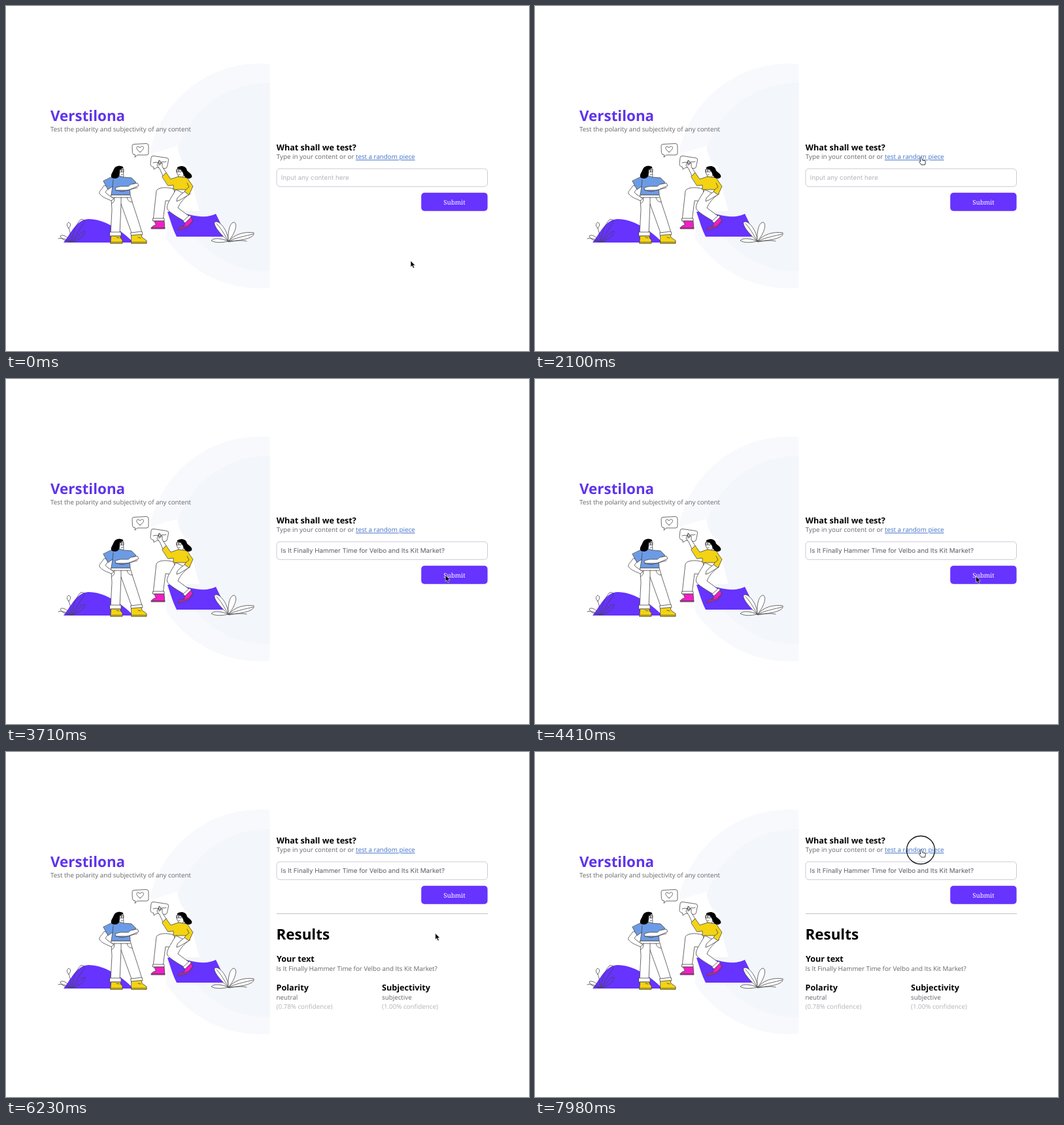
An HTML page for the animation above (8000 ms loop, 800 by 528 pixels).

```html
<!DOCTYPE html>
<html lang="en">
<head>
<meta charset="utf-8">
<title>Verstilona</title>
<style>
html, body { margin: 0; width: 100%; height: 100%; overflow: hidden; background: #fff; }
svg { display: block; width: 100%; height: 100%; font: 9.8px "Open Sans", sans-serif; fill: #66666d; text-rendering: geometricPrecision; }
.h1 { font-size: 22.4px; font-weight: 700; fill: #000; }
.h2 { font-size: 12.6px; font-weight: 700; fill: #000; }
.brand { fill: #6034ea; }
.link { fill: #4272c8; text-decoration: underline; }
.soft { fill: #b3b3b8; }
.input { font-family: Inter, sans-serif; }
.button { font-family: "Noto Serif", serif; font-weight: 500; fill: #fff; text-anchor: middle; }
.ink { fill: none; stroke: #444; stroke-width: .8; stroke-linejoin: round; stroke-linecap: round; }
.ink .w { fill: #fff; }
.ink .k { fill: #000; stroke: none; }
.ink .b { fill: #6c9be6; }
.ink .y { fill: #f3d312; }
.ink .p { fill: #f01fc4; }
</style>
</head>
<body>
<svg viewBox="0 0 800 528">
  <defs><clipPath id="half"><path d="M200 80H403.500V440H200z"/></clipPath></defs>

  <!-- backdrop -->
  <g clip-path="url(#half)">
    <circle cx="388" cy="260" r="172" fill="#f7f9fc"/>
    <circle cx="400" cy="262" r="144" fill="#f3f6fa"/>
    <path fill="#fff" d="M200 205L215 206 222 226 262 214Q266 240 280 246L288 285 296 314H248L244 364H200z"/>
  </g>

  <text class="h1 brand" x="68" y="176">Verstilona</text>
  <text x="68" y="192.300">Test the polarity and subjectivity of any content</text>

  <!-- hills -->
  <g fill="#6633ff">
    <path d="M88 362C99 349 107 327 126 326C149 326 176 342 195 362z"/>
    <path d="M247 315C262 311 277 321 296 322C308 323 314 321 321 318L338 353H261C255 341 252 330 247 315z"/>
  </g>

  <g class="ink">
    <!-- speech bubbles -->
    <path class="w" d="M193 214Q193 211.500 196 211.500L215 210.500Q218 211 218 214V225Q218 228 215 228H201L197 231.500 198 228Q194 228 193.500 225z"/>
    <path d="M205 223.500C195 217 202 212 205 217C209 211 215 218 205 223.500z"/>
    <path class="w" d="M222 232Q222 229 226 229.500L246 232.500Q249 233 248.500 236L246.500 246Q246 249 242 248.500L231 247 226 250V246.500Q221 246 221 242z"/>
    <path d="M225 240l5-1 2 1 3-4 2 4 3-2 1 1 4-1"/>

    <!-- plants -->
    <path d="M100 361C99 350 98 345 96 340M96 340C92 337 93 332 96 331C100 333 99 337 96 340M101 361C102 349 106 335 114 327C121 325 121 331 117 335C112 343 107 350 102 361M99 361C94 352 86 349 83 352C85 358 93 360 99 361M80 356C86 354 94 358 99 361M103 361C110 352 117 344 121 345C120 352 111 358 103 361"/>
    <path class="w" d="M340 360C331 352 317 337 319 331C325 326 340 343 340 360z"/>
    <path class="w" d="M340 360C339 343 343 331 349 331C356 334 348 352 340 360z"/>
    <path class="w" d="M340 360C332 362 320 363 314 359C318 354 331 356 340 360z"/>
    <path class="w" d="M341 360C349 349 365 345 379 347C381 355 361 359 341 360z"/>
    <path d="M340 360C334 349 328 339 322 333M341 360C353 354 367 352 378 349M341 361C352 359 362 358 368 360"/>

    <!-- standing figure -->
    <path class="w" d="M161 289H190L194 303C199 318 204 333 208 347L193 350 176 303 174 350H160L162 312z"/>
    <path class="w" d="M159 346H176V352H159zM191 347L208 345 209 350 192 352z"/>
    <path d="M161 293H190M176 293V303M166 293C166 300 164 301 162 302M185 293C187 299 189 300 193 300"/>
    <path class="y" d="M161 352H175V355L178 358V363.500H160z"/>
    <path class="y" d="M192 351L207 349.500 208 354 215 359V363.500H192z"/>
    <path d="M160 361.500H178M192 361.500H215M169 354l4 1M202 354l4 1"/>
    <path class="w" d="M150 275C145 282 142 284 143 287C147 293 155 295 161 298L165 295 155 288 152 285 158 277z"/>
    <path class="w" d="M173 253V262L179 263 180 260 179 247 174 245z"/>
    <path class="b" d="M163 261L173 260 180 262 192 263 199 270 189 275 190 289H161L163 276 156 281 149 268z"/>
    <path class="w" d="M191 273L201 271 203 275 187 282 168 282 167 278 175 276 187 276z"/>
    <path d="M168 282L178 284 201 278M164 266L163 277"/>
    <path class="k" d="M179 246C172 243 166 245 164 252C162 256 159 260 162 263C166 265 172 264 173 260C175 255 172 251 179 248z"/>
    <path d="M174 250H177V254H174zM177 250H180V254H177zM176 258h3"/>

    <!-- leaping figure -->
    <path class="w" d="M257 280C244 276 232 278 230 283L225 329H240L244 298 258 299z"/>
    <path class="w" d="M260 281L278 290C269 297 265 304 263 309L282 323 274 330C264 324 250 316 247 311C244 306 251 296 260 281z"/>
    <path class="w" d="M225 325H242V329H225zM271 329L281 320 284 324 275 333z"/>
    <path class="p" d="M227 329H242L243 341H222Q222 337 229 335z"/>
    <path class="p" d="M274 332L283 323 286 329 279 338 263 343Q262 338 272 337z"/>
    <path d="M222 339.500H243M264 341L279 336 286 328"/>
    <path class="w" d="M233 239L231 244 235 249 240 260 245 255 239 246 239 240 235 242z"/>
    <path class="w" d="M263 247L261 255 264 261 270 263 273 255z"/>
    <path class="w" d="M278 281L268 288 262 294 261 299 266 297 281 288z"/>
    <path class="y" d="M239 261L245 255 252 265 264 261 277 263 286 276 280 289 273 284 275 281 256 281 256 274 248 275z"/>
    <path d="M277 271L280 277 275 281"/>
    <path class="k" d="M262 247C268 243 276 245 277 252C280 255 286 258 284 262C281 266 274 264 272 259C270 254 269 250 262 249z"/>
    <path d="M261 250H264V254H261zM265 250H268V254H265zM264 258h2M234 244V236M236 243L237 238"/>
  </g>

  <!-- form -->
  <g id="form">
    <text class="h2" x="413.800" y="220.500">What shall we test?</text>
    <text x="413.800" y="234.300">Type in your content or or <tspan class="link">test a random piece</tspan></text>
    <rect x="414" y="249" width="322.500" height="27.300" rx="5" fill="#fff" stroke="#cbcad6"/>
    <text id="field" class="input" x="420.500" y="266"></text>
    <rect x="635.200" y="285.700" width="101.400" height="28" rx="5" fill="#6633ff"/>
    <text class="button" x="686" y="303.500">Submit</text>
  </g>

  <!-- results -->
  <g id="results">
    <path d="M414 247.500H737" stroke="#c3c3c6"/>
    <text class="h1" x="413.500" y="287">Results</text>
    <text class="h2" x="414" y="321.300">Your text</text>
    <text id="echo" x="413.500" y="335"></text>
    <text class="h2" x="413.500" y="365.300">Polarity</text>
    <text x="413.500" y="379.300">neutral</text>
    <text class="soft" x="413.500" y="392.700">(0.78% confidence)</text>
    <text class="h2" x="575" y="365.300">Subjectivity</text>
    <text x="575" y="379.300">subjective</text>
    <text class="soft" x="575" y="392.700">(1.00% confidence)</text>
  </g>

  <!-- pointer -->
  <g id="pointer">
    <circle id="ring" r="21.500" fill="none" stroke="#111" stroke-width="1.300"/>
    <path id="arrow" d="M0 0V9.500L2.200 7.500 3.900 11.300 5.600 10.500 4 6.900H7z" fill="#000" stroke="#fff" stroke-width=".6"/>
    <path id="beam" d="M-2.500-5.500Q0-5.500 0-4Q0-5.500 2.500-5.500M0-4V4.500M-2.500 6Q0 6 0 4.500Q0 6 2.500 6M-1.500 2H1.500" fill="none" stroke="#333"/>
    <path id="hand" d="M-.5 0C.5-1 1.500-.5 1.700.5L2.500 4 6 4.500Q7.500 5 7.300 7L6.500 11H1L-2.500 6.500Q-2 5 0 6L-1 1z" fill="#fff" stroke="#222" stroke-width=".9"/>
  </g>
</svg>
<script>
const LOOP = 8000, FILLED = 2170, SUBMITTED = 5110, LIFT = 81;
const headline = "Is It Finally Hammer Time for Velbo and Its Kit Market?";
const $ = id => document.getElementById(id);
const show = (id, on) => $(id).setAttribute("visibility", on ? "visible" : "hidden");

// pointer stops: time, x, y
const stops = [
  [0, 619, 390], [70, 619, 390], [210, 619, 388], [770, 619, 388],
  [1260, 587, 272], [1540, 590, 232], [2400, 590, 232],
  [3010, 631, 271], [3750, 674.5, 302], [5800, 674.5, 302],
  [7000, 625, 234], [7700, 590, 150], [LOOP, 590, 150]
];
const clicks = [[1750, 2030], [4550, 4830], [7840, LOOP]];

function pointerAt(t) {
  const i = stops.findIndex(s => s[0] > t);
  const [t0, x0, y0] = stops[i - 1], [t1, x1, y1] = stops[i];
  const k = (t - t0) / (t1 - t0);
  return [x0 + (x1 - x0) * k, y0 + (y1 - y0) * k];
}

$("echo").textContent = headline;

function draw(now) {
  const t = now % LOOP;
  const filled = t >= FILLED, done = t >= SUBMITTED;
  const [x, y] = pointerAt(t);
  const formY = done ? y + LIFT : y;
  const onField = x > 414 && x < 737 && formY > 249 && formY < 277;
  const onLink = x > 535 && x < 627 && formY > 225 && formY < 238;

  $("form").setAttribute("transform", `translate(0 ${done ? -LIFT : 0})`);
  $("field").textContent = filled ? headline : "Input any content here";
  $("field").style.fill = filled ? "#5c5c64" : "#b6b6be";
  show("results", done);

  $("pointer").setAttribute("transform", `translate(${x} ${y})`);
  show("beam", onField);
  show("hand", onLink);
  show("arrow", !onField && !onLink);
  show("ring", clicks.some(([from, to]) => t >= from && t < to));
}

const start = performance.now();
function tick() {
  draw(performance.now() - start);
  requestAnimationFrame(tick);
}
tick();
</script>
</body>
</html>
```
